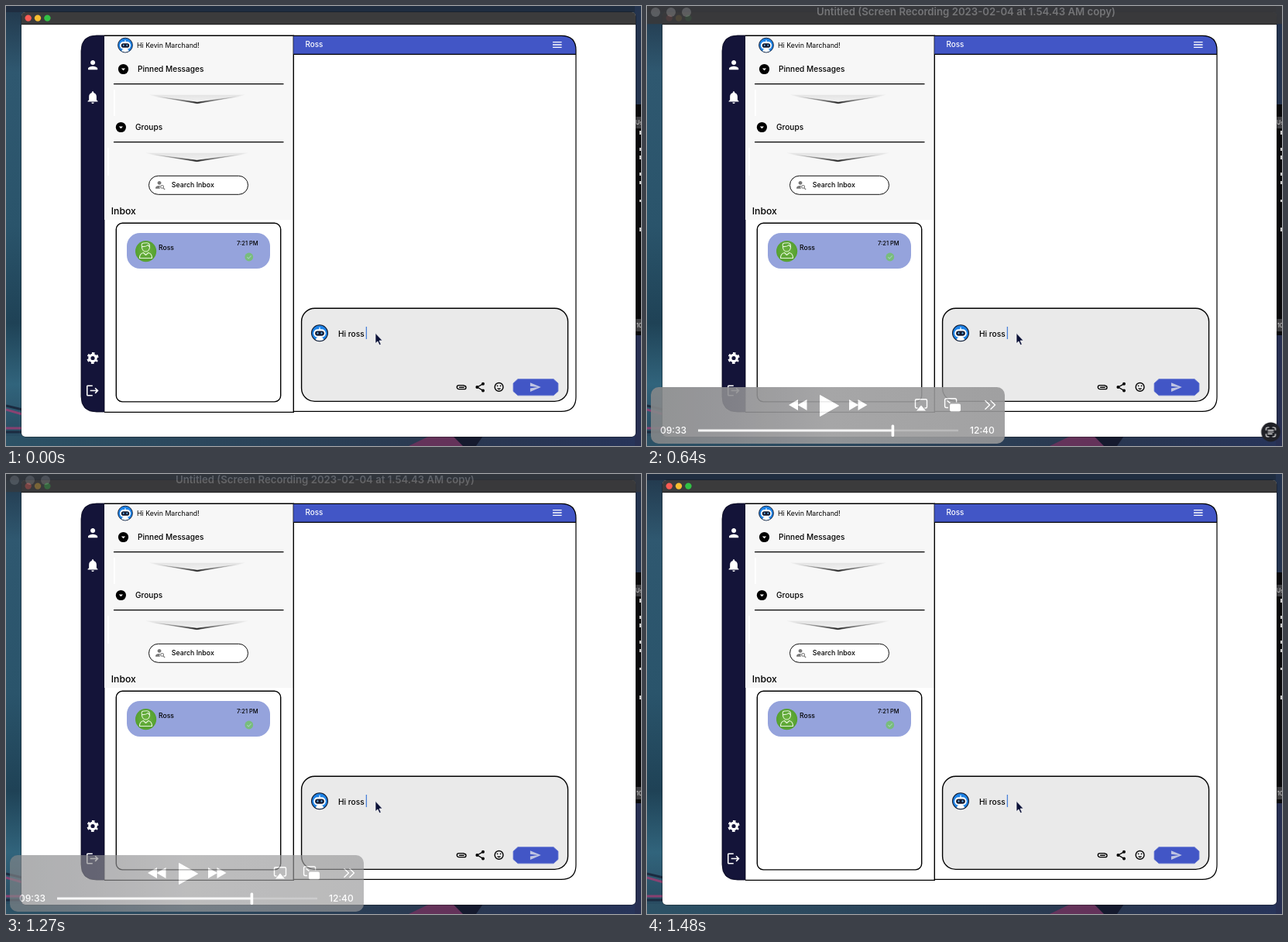
An HTML page that plays this animation: 820 by 568 pixels, repeating every 3090 ms.

```html
<!DOCTYPE html>
<html lang="en">
<head>
<meta charset="utf-8">
<title>Chat inbox</title>
<style>
  html, body { margin: 0; width: 100%; height: 100%; overflow: hidden; background: #1d2a3c; }
  svg { display: block; width: 820px; height: 568px; }
  text { font-family: Inter, "Open Sans", sans-serif; font-weight: 500; white-space: pre; }
  .line { fill: none; stroke: #000; stroke-width: 1.4; }
  .white { fill: #fff; }
  .ink { fill: none; stroke: #000; stroke-width: 1.4; stroke-linecap: round; stroke-linejoin: round; }
  .pale { fill: none; stroke: #fff; stroke-width: 1.4; stroke-linejoin: round; }
  .player, .scan { opacity: 0; animation: 3090ms step-end infinite; }
  .player { animation-name: controls; }
  .scan { animation-name: scan; }
  @keyframes controls {
    0% { opacity: 0; }
    16.18% { opacity: .035; }
    18.446% { opacity: .74; }
    20.711% { opacity: .9; }
    22.977% { opacity: .97; }
    25.242% { opacity: 1; }
    41.1% { opacity: .67; }
    43.365% { opacity: .15; }
    45.631% { opacity: .03; }
    47.896%, 100% { opacity: 0; }
  }
  @keyframes scan {
    0% { opacity: 0; }
    16.18% { opacity: 1; }
    41.1%, 100% { opacity: 0; }
  }
</style>
</head>
<body>
<svg viewBox="0 0 820 568">
  <defs>
    <linearGradient id="desk" x1="0" y1="0" x2="0" y2="1">
      <stop offset="0" stop-color="#22384c"/>
      <stop offset=".15" stop-color="#2f5870"/>
      <stop offset=".5" stop-color="#2a546b"/>
      <stop offset=".72" stop-color="#1f4256"/>
      <stop offset=".86" stop-color="#31647c"/>
      <stop offset="1" stop-color="#27475c"/>
    </linearGradient>
    <linearGradient id="floor">
      <stop offset="0" stop-color="#2c5266"/>
      <stop offset=".45" stop-color="#2b4258"/>
      <stop offset=".7" stop-color="#2a3850"/>
      <stop offset="1" stop-color="#27345a"/>
    </linearGradient>
    <linearGradient id="fold" x1="0" y1="0" x2="0" y2="1">
      <stop offset="0" stop-color="#e4e4e4"/>
      <stop offset="1" stop-color="#f4f4f4"/>
    </linearGradient>
    <linearGradient id="edge">
      <stop offset="0" stop-color="#999" stop-opacity="0"/>
      <stop offset=".5" stop-color="#222"/>
      <stop offset="1" stop-color="#999" stop-opacity="0"/>
    </linearGradient>
    <linearGradient id="glass">
      <stop offset="0" stop-color="#858789"/>
      <stop offset=".22" stop-color="#8d8d90"/>
      <stop offset=".5" stop-color="#9c9c9d"/>
      <stop offset="1" stop-color="#989899"/>
    </linearGradient>
    <radialGradient id="leaf">
      <stop offset="0" stop-color="#6cb33f"/>
      <stop offset="1" stop-color="#55a030"/>
    </radialGradient>

    <g id="robot">
      <circle r="10" fill="#1f83e6" stroke="#101a30" stroke-width="1"/>
      <path d="M-5 8.2Q-4 4.5 0 4.5T5 8.2Q0 10.6-5 8.2Z" class="white"/>
      <path d="M0-7V-4" stroke="#fff" stroke-width="1.2"/>
      <rect x="-7.4" y="-4.8" width="14.8" height="10" rx="4.8" class="white"/>
      <rect x="-5.6" y="-2.6" width="11.2" height="6" rx="3" fill="#141b33"/>
      <circle cx="-2.4" r="1" cy=".2" fill="#6fc3ff"/>
      <circle cx="2.4" r="1" cy=".2" fill="#6fc3ff"/>
    </g>
    <g id="drop">
      <circle r="6.6"/>
      <path d="M-2.6-1H2.6L0 1.7Z" class="white"/>
    </g>
    <g id="chevron">
      <path d="M-62-5.5H62L0 5.5Z" fill="url(#fold)"/>
      <path d="M-58-4.3L0 5.4L58-4.3L0 4Z" fill="url(#edge)" stroke="url(#edge)" stroke-width=".7"/>
    </g>
    <path id="skip" d="M0 0L12-7V7ZM11.5 0L23.5-7V7Z"/>
    <path id="person" d="M12 12c2.21 0 4-1.79 4-4s-1.79-4-4-4-4 1.79-4 4 1.79 4 4 4zm0 2c-2.67 0-8 1.34-8 4v2h16v-2c0-2.66-5.33-4-8-4z"/>
  </defs>

  <!-- desktop -->
  <rect width="820" height="568" fill="url(#desk)"/>
  <rect width="820" height="8" fill="#1f2d40"/>
  <rect y="555" width="820" height="13" fill="url(#floor)"/>
  <path d="M0 521L21 527M0 545H21" stroke="#a83c74" stroke-width="3" opacity=".75"/>
  <path d="M0 516L21 521M0 550H21" stroke="#1b2b40" stroke-width="3"/>
  <path d="M520 568L545 556H590L600 568Z" fill="#8b2f61" opacity=".6"/>
  <path d="M577 555H616L607 568H590Z" fill="#151a2e"/>
  <rect x="812" width="8" height="128" fill="#24344f"/>
  <rect x="812" y="425" width="8" height="143" fill="#283052"/>
  <rect x="812" y="127" width="8" height="298" fill="#09090b"/>
  <path d="M812 143h8v15h-8zM812 404h8v16h-8z" fill="#3d3d40"/>
  <g fill="#ccc" font-size="7">
    <text x="813" y="153">Us</text>
    <text x="814" y="415">10</text>
    <path d="M818 161h2v5h-2zM818 183h2v4h-2zM818 193h2v5h-2zM818 215h2v4h-2zM818 226h2v4h-2zM818 250h2v3h-2zM818 286h2v5h-2z"/>
  </g>

  <!-- window -->
  <rect x="19.5" y="7.5" width="794" height="549" rx="6" fill="#111" opacity=".7"/>
  <rect x="20" y="8" width="793" height="548" rx="5" class="white"/>
  <path d="M20 24V13q0-5 5-5H808q5 0 5 5V24Z" fill="#3b3b3c"/>
  <path d="M20 23.7H813" stroke="#111" stroke-width=".8"/>
  <circle cx="28.7" cy="15.6" r="4.2" fill="#fb5b54"/>
  <circle cx="41" cy="15.6" r="4.2" fill="#f9bd30"/>
  <circle cx="53.4" cy="15.6" r="4.2" fill="#32c145"/>

  <!-- sidebar -->
  <path d="M127 38H117Q97 38 97 58V504Q97 524 117 524H127Z" fill="#141439" stroke="#05051a" stroke-width=".8"/>
  <g class="white">
    <use href="#person" transform="translate(103 67) scale(.76)"/>
    <path transform="translate(102.3 108.2) scale(.81)" d="M12 22c1.1 0 2-.9 2-2h-4c0 1.1.89 2 2 2zm6-6v-5c0-3.07-1.64-5.64-4.5-6.32V4c0-.83-.67-1.5-1.5-1.5s-1.5.67-1.5 1.5v.68C7.63 5.36 6 7.92 6 11v5l-2 2v1h16v-1l-2-2z"/>
    <path transform="translate(102.4 487.2) scale(.78)" d="M17 7l-1.41 1.41L18.17 11H8v2h10.17l-2.58 2.58L17 17l5-5zM4 5h8V3H4c-1.1 0-2 .9-2 2v14c0 1.1.9 2 2 2h8v-2H4V5z"/>
  </g>
  <g fill="none" stroke="#fff" transform="translate(112 454.5)">
    <circle r="4.2" stroke-width="3.2"/>
    <circle r="6.3" stroke-width="2.6" stroke-dasharray="3.3 3.297" stroke-dashoffset="1.65" transform="rotate(30)"/>
  </g>

  <!-- inbox column -->
  <rect x="127" y="38" width="244" height="238" fill="#f7f7f7"/>
  <path d="M127 38.3H371.3V524.4H127" class="line"/>
  <use href="#robot" transform="translate(154 50.6) scale(.94)"/>
  <text x="169" y="54" font-size="8.8" style="font-weight:400">Hi Kevin Marchand!</text>
  <use href="#drop" x="151.5" y="81.5"/>
  <text x="170" y="85.2" font-size="10.1">Pinned Messages</text>
  <path d="M139 100.6H358.5M139 175.6H358.5" class="line"/>
  <path d="M140 108V142M132 183V219" stroke="#fff" stroke-width="2"/>
  <use href="#chevron" x="247" y="120.3"/>
  <use href="#drop" x="148.4" y="156.5"/>
  <text x="167" y="160.2" font-size="10.1">Groups</text>
  <use href="#chevron" transform="translate(246.5 195.3) scale(1.07 1)"/>
  <rect x="184.5" y="219.3" width="128" height="24" rx="12" fill="#fff" stroke="#111"/>
  <use href="#person" transform="translate(190.6 223.4) scale(.62)" fill="#777"/>
  <circle cx="201.8" cy="233.8" r="3.4" class="white"/>
  <g fill="none" stroke="#777" stroke-width="1.1">
    <circle cx="201.6" cy="233.4" r="1.9"/>
    <path d="M203 234.8L205.2 237"/>
  </g>
  <text x="213.8" y="234.4" font-size="8.8">Search Inbox</text>
  <text x="135.8" y="269.2" font-size="12.2">Inbox</text>
  <rect x="142.3" y="280.3" width="212.4" height="230.6" rx="8" class="line white" style="fill:#fff"/>
  <rect x="156" y="293" width="185" height="46" rx="17" fill="#95a3dc"/>
  <circle cx="180.6" cy="316.6" r="13.6" fill="url(#leaf)"/>
  <g fill="none" stroke="#e4f4d8" stroke-width="1.1" stroke-linejoin="round">
    <path d="M175.5 310.5Q174 305.5 179 306Q186 304.5 185.5 310.5V312Q184.5 317 180.5 317T175.5 312Z"/>
    <path d="M175.5 310.5Q181 311 183 308.5L185.5 311M172.5 325.5Q172.5 319.5 177.5 318.5L180.5 321.5L183.8 318.5Q188.5 319.5 188.5 325.5Z"/>
  </g>
  <text x="197" y="315.2" font-size="8.6">Ross</text>
  <text x="298" y="308.6" font-size="7.5">7:21 PM</text>
  <circle cx="313.8" cy="324" r="5.4" fill="#78bd7c"/>
  <path d="M311.3 324.2L313.2 326L316.6 322.3" fill="none" stroke="#a4cfb6" stroke-width="1.1"/>

  <!-- conversation -->
  <path d="M371.3 62V38.3H717Q736 38.3 736 57V62Z" fill="#4256c6"/>
  <path d="M371.3 38.3H717Q736 38.3 736 57V504.5Q736 523.4 717 523.4H371.3M371.3 62.3H736" class="line" style="stroke-width:1.2"/>
  <text x="386.5" y="53.4" font-size="9.8" class="white">Ross</text>
  <path d="M706 46.6H717.6M706 50H717.6M706 53.4H717.6" stroke="#fff" stroke-width="1.4"/>
  <rect x="381.6" y="390.2" width="344" height="120.2" rx="17" fill="#eaeaea" stroke="#000" stroke-width="1.4"/>
  <use href="#robot" transform="translate(405 422.2) scale(1.05)"/>
  <text x="429" y="426.5" font-size="10.2">Hi ross</text>
  <path d="M465.4 414V430" stroke="#4a80d8" stroke-width="1.3"/>
  <path d="M477 422.3V435.6L480 432.9L482.2 437.8L484.3 436.8L482.1 432H486.2Z" fill="#0c1238" stroke="#fff" stroke-width=".7"/>

  <path d="M591.2 489.6H584.8A2.5 2.5 0 0 0 584.8 494.6H591.8A1.9 1.9 0 0 0 591.8 490.2M591.2 492.2H585.6" class="ink"/>
  <path d="M616.2 487.6L608.6 492L616.2 496.6" class="ink"/>
  <circle cx="616" cy="487.7" r="2"/>
  <circle cx="608.4" cy="492" r="2"/>
  <circle cx="616" cy="496.5" r="2"/>
  <circle cx="636.6" cy="491.9" r="5.4" class="ink"/>
  <path d="M633.8 493.6Q636.6 497 639.4 493.6Z"/>
  <circle cx="634.6" cy="490.3" r=".9"/>
  <circle cx="638.6" cy="490.3" r=".9"/>
  <path d="M661 481.6H707L713 487V497.4L707 502.8H661L655 497.4V487Z" fill="#4256c6" stroke="#6f7fd4" stroke-width=".8" stroke-linejoin="round"/>
  <path transform="translate(675.6 484.2) scale(.66)" fill="#bfc4e2" d="M2.01 21L23 12 2.01 3 2 10l15 2-15 2z"/>

  <!-- player controls -->
  <g class="player">
    <rect width="820" height="23.2" fill="#39393b"/>
    <g fill="#626264">
      <circle cx="11" cy="8" r="6"/>
      <circle cx="31" cy="8" r="6"/>
      <circle cx="51" cy="8" r="6"/>
    </g>
    <text x="412" y="12" font-size="13.2" text-anchor="middle" fill="#7d7d7f" style="font-weight:600">Untitled (Screen Recording 2023-02-04 at 1.54.43 AM copy)</text>
    <rect x="5" y="492" width="457" height="73" rx="10" fill="url(#glass)"/>
    <g class="white">
      <use href="#skip" x="183" y="515"/>
      <path d="M223.5 502.5L247.5 516L223.5 529.5Z" stroke="#fff" stroke-linejoin="round"/>
      <use href="#skip" transform="translate(284.5 515) scale(-1 1)"/>
      <path d="M354 515.5L360 522.5H348Z"/>
      <rect x="391" y="513.4" width="14" height="10" rx="2"/>
      <text x="17" y="552.2" font-size="12">09:33</text>
      <text x="417" y="552.2" font-size="12">12:40</text>
    </g>
    <path d="M349.5 519H348Q346.5 519 346.5 517.5V509.2Q346.5 507.7 348 507.7H360Q361.5 507.7 361.5 509.2V517.5Q361.5 519 360 519H358.5" class="pale"/>
    <path d="M389 518.5H386.6Q384.6 518.5 384.6 516.5V508.7Q384.6 506.7 386.6 506.7H397.6Q399.6 506.7 399.6 508.7V511.5M387.5 509.5L391.5 512.6" class="pale"/>
    <path d="M436.5 509.3L442.5 515L436.5 520.7M443.5 509.3L449.5 515L443.5 520.7" class="pale"/>
    <path d="M317 548H402" stroke="#b3b3b4" stroke-width="2.6"/>
    <path d="M66 548H317" stroke="#f4f4f4" stroke-width="2.8"/>
    <rect x="315.6" y="540.5" width="3.6" height="15.5" rx="1.5" class="white"/>
  </g>

  <!-- text scan button -->
  <g class="scan" transform="translate(805.5 550)">
    <circle r="12.4" fill="#202127"/>
    <path d="M-6-2.5V-4Q-6-6-4-6H-2.5M2.5-6H4Q6-6 6-4V-2.5M6 2.5V4Q6 6 4 6H2.5M-2.5 6H-4Q-6 6-6 4V2.5M-3.4-2.4H3.4M-3.4 0H3.4M-3.4 2.4H1.6" fill="none" stroke="#eee" stroke-width="1.2" stroke-linecap="round"/>
  </g>
</svg>
</body>
</html>
```
